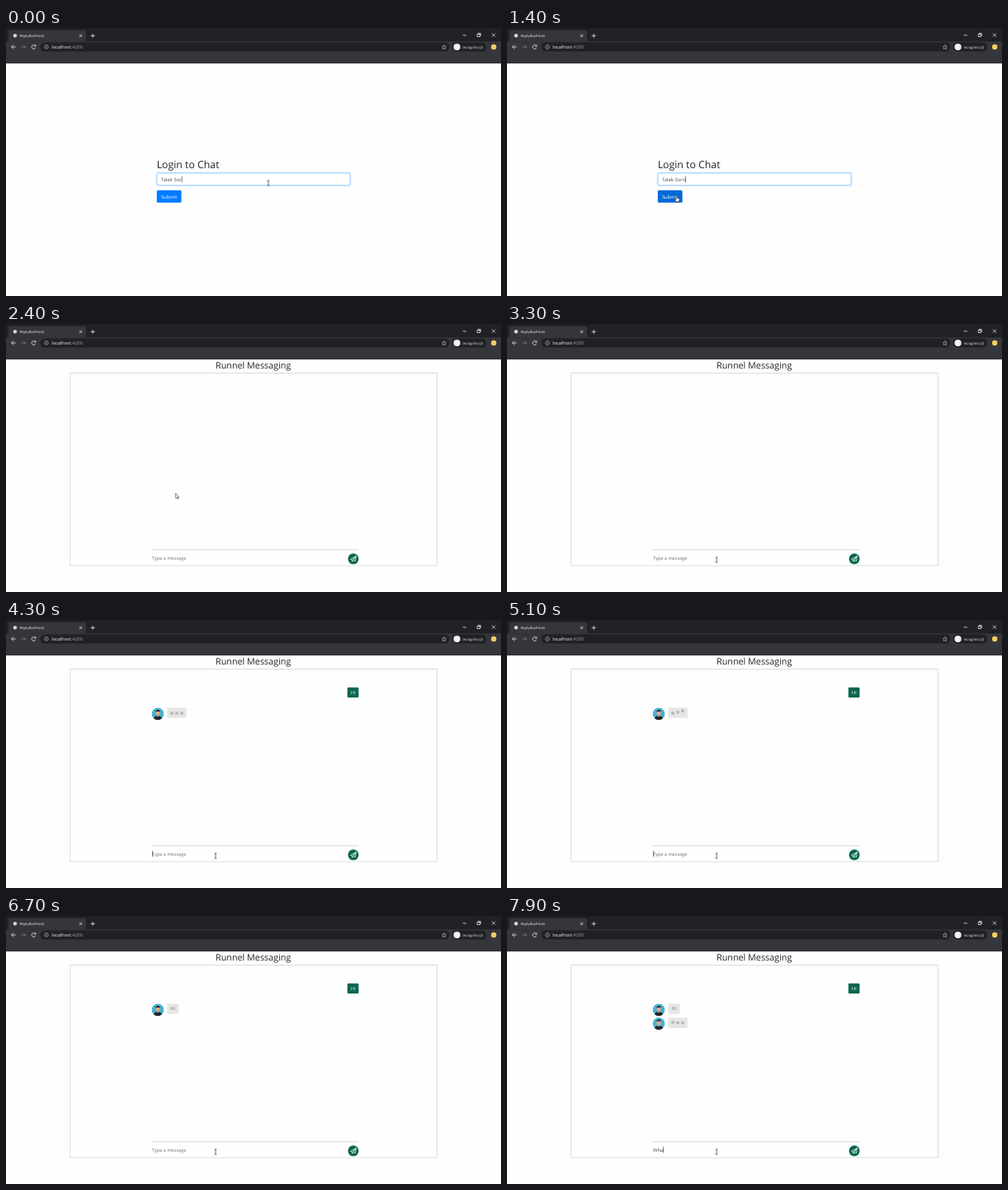
An HTML page that plays this animation: 600 by 325 pixels, repeating every 8000 ms.

```html
<!DOCTYPE html>
<html lang="en">
<head>
<meta charset="utf-8">
<title>Chat login</title>
<style>
  html, body { margin: 0; width: 100%; height: 100%; overflow: hidden; background: #fff; }
  svg { display: block; width: 600px; height: 325px; }
  text { font-family: "Open Sans", "Noto Sans", sans-serif; font-size: 5.9px; text-rendering: geometricPrecision; white-space: pre; }
  .title { font-weight: 500; fill: #212529; }
  .line { fill: none; stroke: #e8eaed; stroke-width: .8; }
  .hint { font-size: 5.6px; fill: #757575; }
  .typed { fill: #495057; }
  .small { font-size: 4.3px; fill: #e8eaed; }
</style>
</head>
<body>
<svg viewBox="0 0 600 325">
  <defs>
    <clipPath id="round"><circle r="7.5"/></clipPath>
    <g id="avatar" clip-path="url(#round)">
      <circle r="7.5" fill="#45b3d3"/>
      <path d="M-5.6 8C-5.4 3.6-3 2.4 0 2.4S5.4 3.6 5.6 8Z" fill="#20252c"/>
      <rect x="-1.1" y="0" width="2.2" height="3.4" fill="#c99a7c"/>
      <ellipse cy="-1.2" rx="2.6" ry="3.3" fill="#d8ab8d"/>
      <path d="M-2.8-1.4C-3.4-6.4 3.4-6.4 2.8-1.4L2.2-2.9H-2.2Z" fill="#20252c"/>
    </g>
  </defs>
  <rect width="600" height="325" fill="#fefefe"/>

  <g id="browser">
    <rect width="600" height="43" fill="#35363a"/>
    <rect width="600" height="16.3" fill="#202124"/>
    <path d="M1 16.5Q3 16.5 3 14V5Q3 2.7 5.3 2.7H94.7Q97 2.7 97 5V14Q97 16.5 99 16.5Z" fill="#35363a"/>
    <circle cx="11" cy="9.3" r="2.2" fill="#d5d7da"/>
    <text class="small" x="16.5" y="10.9">ReplyBoxPanel</text>
    <g class="line">
      <path d="M88.9 7.8l3.2 3.2m0-3.2l-3.2 3.2M102.6 9.4h5.2M105.2 6.8v5.2"/>
      <path d="M553.7 8.8h4.2M571.2 7.5h3v3h-3zM572.3 7.3v-.9h3v3h-.9M589 6.5l4 4m0-4l-4 4"/>
      <path d="M11.8 23H6.7m2.4-2.5L6.6 23l2.5 2.5"/>
      <path d="M18.6 23h5.1m-2.4-2.5l2.5 2.5-2.5 2.5" stroke="#77797d" style="stroke:#77797d"/>
      <path d="M35.4 21.4A2.4 2.4 0 1 0 35.8 23.8M36 20.3v1.8h-1.9"/>
    </g>
    <rect x="41.5" y="17.5" width="496" height="11" rx="5.5" fill="#202124"/>
    <g class="line" style="stroke:#c4c7cb;stroke-width:.6">
      <circle cx="49" cy="23" r="2.3"/>
      <path d="M49 22.7v1.5M49 21.4v.6"/>
      <path d="M531 20.4l.8 1.8 1.9.2-1.4 1.3.4 1.9-1.7-1-1.7 1 .4-1.9-1.4-1.3 1.9-.2z"/>
    </g>
    <text x="55.3" y="25" style="font-size:5.6px" fill="#f1f3f4">localhost<tspan fill="#9aa0a6">:4200</tspan></text>
    <rect x="540.5" y="17.5" width="42" height="11" rx="5.5" fill="#202124"/>
    <circle cx="546.6" cy="23" r="4.1" fill="#f1f3f4"/>
    <text class="small" x="553.5" y="24.6">Incognito (2)</text>
    <circle cx="591.2" cy="23" r="3.2" fill="#f2cf63"/>
  </g>

  <g id="login">
    <text class="title" x="182.7" y="170.4" style="font-size:12.3px">Login to Chat</text>
    <rect id="fieldRing" x="182.4" y="175.4" width="235.2" height="15.8" rx="2.4" fill="none" stroke="#bfdeff" stroke-width="1.3"/>
    <rect id="field" x="183.1" y="176.1" width="233.8" height="14.4" rx="1.6" fill="#fff" stroke-width=".5"/>
    <text id="user" class="typed" x="188" y="186"></text>
    <rect id="buttonRing" x="182.2" y="196.2" width="31.1" height="16.4" rx="2.2" fill="none" stroke="#7fb5ef" stroke-width="1.4"/>
    <rect id="button" x="182.8" y="196.8" width="29.8" height="15" rx="1.6"/>
    <rect id="dotted" x="183" y="197" width="29.4" height="14.6" rx="1.4" fill="none" stroke="#173d66" stroke-width=".6" stroke-dasharray=".8 .8"/>
    <text x="187.9" y="206.6" fill="#fff">Submit</text>
  </g>

  <g id="chat">
    <text class="title" x="299.7" y="54.3" text-anchor="middle" style="font-size:10.8px">Runnel Messaging</text>
    <rect x="77.8" y="59.6" width="444.8" height="233.4" fill="none" stroke="#cbd9d5" stroke-width=".8"/>
    <path d="M176.8 273.8H427.3" stroke="#c9cfcd" stroke-width=".8"/>
    <text id="hint" class="hint" x="177" y="285.7">Type a message</text>
    <text id="draft" class="typed" x="177" y="285.7"></text>
    <circle cx="421" cy="284.8" r="6.5" fill="#0b6650"/>
    <path d="M417.6 285.3l6.8-3.9-1.1 6.3-2.3-1-1.3 1.5-.2-2.2zM419.6 286l4.6-4.4-3.2 5" fill="none" stroke="#fff" stroke-width=".7" stroke-linejoin="round"/>
    <g id="sent">
      <rect x="413.8" y="81.7" width="13.6" height="12.2" rx="1" fill="#0b6650"/>
      <text x="418" y="90" fill="#fff" style="font-size:5.6px">Hi</text>
    </g>
    <g id="reply">
      <use href="#avatar" x="184" y="113.8"/>
      <rect id="replyBox" x="195.3" y="106.2" height="12.6" rx="1" fill="#e6e6e6"/>
      <text id="replyText" x="199.5" y="114.4" fill="#777" style="font-size:5.6px">Hi</text>
      <g id="dotsA"></g>
    </g>
    <g id="next">
      <use href="#avatar" x="184" y="130.5"/>
      <rect x="195.3" y="123.3" width="23.5" height="12.8" rx="1" fill="#e6e6e6"/>
      <g id="dotsB"></g>
    </g>
  </g>

  <rect id="caret" width=".6" height="7.4" fill="#222"/>
  <g id="mouse">
    <path id="beam" d="M-1.3-3h2.6M0-3V3M-1.3 3h2.6" stroke="#333" stroke-width=".7" fill="none"/>
    <path id="hand" d="M-.9-3.2Q0-4 .6-3.1V-.7L2.6 0Q3.3.4 3.1 1.3L2.5 3.8H-.8L-2.6 1.2Q-2.6.2-1.7.5L-.9 1.1Z" fill="#fff" stroke="#111" stroke-width=".6"/>
    <path id="arrow" d="M0-3V3.2L1.4 2 2.4 4.2 3.3 3.8 2.3 1.7H4.2Z" fill="#fff" stroke="#111" stroke-width=".5"/>
  </g>
</svg>
<script>
const LOOP = 8000, BLINK = 530;
const NAME = "Talek Sorn";
const T = { lastKey: 200, hover: 1050, press: 1700, chat: 2200, focus: 3700,
            send: 4300, reply: 6000, next: 7800 };

const $ = Object.fromEntries([...document.querySelectorAll("[id]")].map(e => [e.id, e]));
const show = (el, on) => { el.style.display = on ? "" : "none"; };
const at = (el, values) => { for (const k in values) el.setAttribute(k, values[k]); };

// [time, value] steps: the latest one reached holds
const hold = (steps, t) => steps.reduce((v, s) => t >= s[0] ? s[1] : v, "");
const DRAFT = [[3900, "H"], [4100, "Hi"], [T.send, ""], [7450, "W"], [7620, "Wh"], [7800, "Wha"]];

const PATH = [[0, 318, 188], [550, 318, 188], [1150, 206, 207], [1600, 206, 207],
              [1800, 205, 207], [2350, 205, 207], [3050, 254, 286], [LOOP, 254, 286]];

function mouseAt(t) {
  const i = PATH.findIndex(p => p[0] > t);
  const [t0, x0, y0] = PATH[i - 1], [t1, x1, y1] = PATH[i];
  const u = (t - t0) / (t1 - t0), e = u * u * (3 - 2 * u);
  return [x0 + (x1 - x0) * e, y0 + (y1 - y0) * e];
}

function makeDots(group, y) {
  return [0, 1, 2].map(i => {
    const dot = document.createElementNS("http://www.w3.org/2000/svg", "circle");
    at(dot, { cx: 201 + 6 * i, cy: y, r: 2, fill: "#b9b9b9" });
    group.append(dot);
    return dot;
  });
}
const dotsA = makeDots($.dotsA, 112.9), dotsB = makeDots($.dotsB, 129.5);

// Each dot hops during the first 60% of its cycle
function wave(dots, y, age) {
  dots.forEach((dot, i) => {
    const p = ((age - 200 * i + 1300) % 1300) / 1300;
    const lift = p < .6 ? (1 - Math.cos(p / .6 * 2 * Math.PI)) / 2 : 0;
    dot.setAttribute("cy", y - 2.6 * lift);
  });
}

function drawLogin(t) {
  const pressed = t >= T.press;
  $.user.textContent = t < T.lastKey ? NAME.slice(0, -1) : NAME;
  show($.fieldRing, !pressed);
  at($.field, { stroke: pressed ? "#ced4da" : "#80bdff" });
  show($.buttonRing, pressed);
  show($.dotted, pressed);
  at($.button, { fill: pressed ? "#0062cc" : t >= T.hover ? "#0069d9" : "#007bff" });
}

function drawChat(t) {
  const draft = hold(DRAFT, t), replied = t >= T.reply;
  $.draft.textContent = draft;
  show($.hint, !draft);
  show($.sent, t >= T.send);
  show($.reply, t >= T.send);
  at($.replyBox, { width: replied ? 14 : 23.5 });
  show($.replyText, replied);
  show($.dotsA, !replied);
  show($.next, t >= T.next);
  wave(dotsA, 112.9, Math.max(0, t - T.send));
  wave(dotsB, 129.5, Math.max(0, t - T.next));
}

function drawCaret(t, inChat) {
  const text = inChat ? $.draft : $.user;
  const width = text.textContent ? text.getComputedTextLength() : 0;
  const focused = inChat ? t >= T.focus : t < T.press;
  const since = !inChat ? (t < T.lastKey ? 0 : T.lastKey)
    : t < 4600 ? t : t < 7450 ? 4600 : t;
  show($.caret, focused && Math.floor((t - since) / BLINK) % 2 === 0);
  at($.caret, { x: (inChat ? 177 : 188) + width + .1, y: inChat ? 279.8 : 179.8 });
}

function drawMouse(t, inChat) {
  const [x, y] = mouseAt(t);
  const beam = inChat ? y > 277 : y < 190.5;
  const hand = !inChat && t >= T.hover;
  at($.mouse, { transform: `translate(${x} ${y})` });
  show($.beam, beam);
  show($.hand, hand);
  show($.arrow, !beam && !hand);
}

function render(t) {
  const inChat = t >= T.chat;
  show($.login, !inChat);
  show($.chat, inChat);
  if (inChat) drawChat(t); else drawLogin(t);
  drawCaret(t, inChat);
  drawMouse(t, inChat);
}

const start = performance.now();
function tick() {
  render((performance.now() - start) % LOOP);
  requestAnimationFrame(tick);
}
tick();
</script>
</body>
</html>
```
